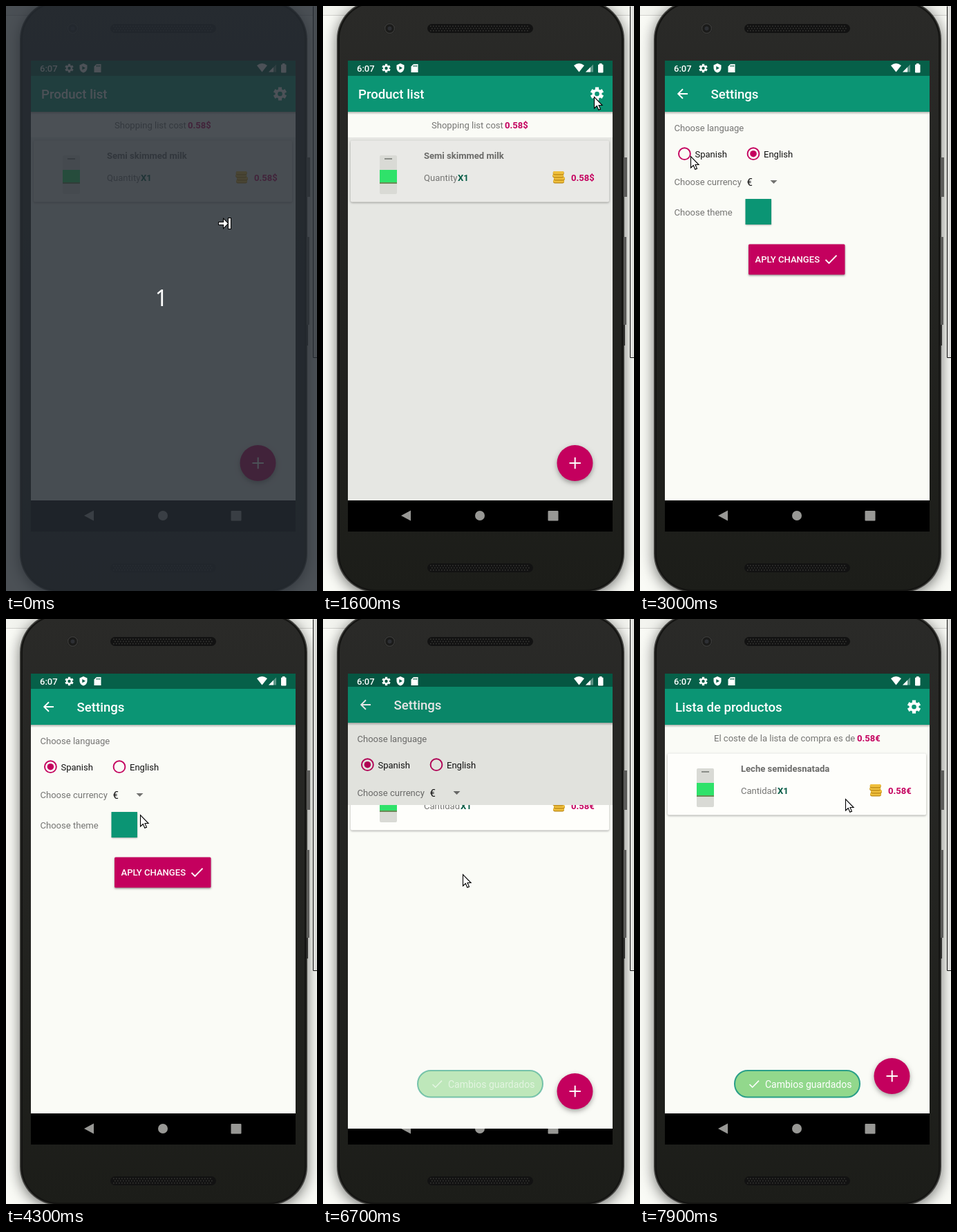
Animation of 450 by 846 pixels, one loop 8 s. Source, as an HTML page with a canvas:

```html
<!DOCTYPE html>
<html lang="en">
<head>
<meta charset="utf-8">
<title>Shopping list settings</title>
<style>
  html, body { margin: 0; width: 100%; height: 100%; overflow: hidden; }
  canvas { display: block; }
</style>
</head>
<body>
<canvas id="stage" width="450" height="846"></canvas>
<script>
const ctx = document.getElementById('stage').getContext('2d');
const LOOP = 8000, STEP = 100;
const PINK = '#c4005e', TEAL = '#0b9574', DEEP = '#066049', GREY = '#757573', PAPER = '#fafbf6';
const SCREEN = { x: 36, y: 79, w: 383, h: 681, content: 636 };
const OPEN_SETTINGS = 1766, OPEN_LIST = 6600, SLIDE = 425;

// Pointer stops: arrival time and place. Each move takes at most MOVE ms.
const MOVE = 700;
const stop = (at, x, y) => ({ at, x, y });
const STOPS = [
  stop(200, 329, 307), stop(1000, 392, 131), stop(2400, 194, 250), stop(3000, 73, 217),
  stop(4200, 194, 295), stop(4500, 194, 259), stop(4800, 156, 245), stop(5400, 173, 266),
  stop(5800, 204, 356), stop(6000, 202, 369), stop(7900, 297, 260)
];

const clamp = v => Math.max(0, Math.min(1, v));
const mix = (a, b, p) => a + (b - a) * p;
const bez = (a, b, c, d, u) => {
  const v = 1 - u;
  return v * v * v * a + 3 * v * v * u * b + 3 * v * u * u * c + u * u * u * d;
};

function curve(x, xs, ys) {
  let lo = 0, hi = 1;
  for (let i = 0; i < 24; i++) {
    const m = (lo + hi) / 2;
    if (bez(...xs, m) < x) lo = m; else hi = m;
  }
  return bez(...ys, lo);
}
const slideEase = p => curve(p, [0, .4, .2, 1], [0, 0, 1, 1]);
const revealEase = p => p < 1 / 6
  ? curve(p, [0, .05, .1333, 1 / 6], [0, 0, .06, .4])
  : curve(p, [1 / 6, .2083, .25, 1], [.4, .82, 1, 1]);

function rect(x, y, w, h, color) {
  ctx.fillStyle = color;
  ctx.fillRect(x, y, w, h);
}
function round(x, y, w, h, r, color) {
  ctx.fillStyle = color;
  ctx.beginPath();
  ctx.roundRect(x, y, w, h, r);
  ctx.fill();
}
function disc(x, y, r, color) {
  ctx.fillStyle = color;
  ctx.beginPath();
  ctx.arc(x, y, r, 0, 7);
  ctx.fill();
}
function ring(x, y, r, width, color) {
  ctx.strokeStyle = color;
  ctx.lineWidth = width;
  ctx.beginPath();
  ctx.arc(x, y, r, 0, 7);
  ctx.stroke();
}
function fillPath(d, x, y, color) {
  const path = new Path2D(d);
  ctx.save();
  ctx.translate(x, y);
  ctx.fillStyle = color;
  ctx.fill(path);
  ctx.restore();
  return path;
}
function strokePath(d, x, y, width, color) {
  ctx.save();
  ctx.translate(x, y);
  ctx.strokeStyle = color;
  ctx.lineWidth = width;
  ctx.stroke(new Path2D(d));
  ctx.restore();
}
function text(s, x, y, color = GREY, weight = 400, size = 13.05) {
  ctx.font = `${weight} ${size}px Roboto, sans-serif`;
  ctx.fillStyle = color;
  ctx.fillText(s, x, y);
}
function shadowed(blur, dy, alpha, draw) {
  ctx.save();
  ctx.shadowColor = `rgba(0,0,0,${alpha})`;
  ctx.shadowBlur = blur;
  ctx.shadowOffsetY = dy;
  draw();
  ctx.restore();
}
function gear(x, y, r) {
  ring(x, y, r * .54, r * .38, '#fff');
  for (let i = 0; i < 6; i++) {
    ctx.save();
    ctx.translate(x, y);
    ctx.rotate(i * Math.PI / 3);
    rect(-r * .27, -r, r * .54, r * .4, '#fff');
    ctx.restore();
  }
}
const check = (x, y, w, width) =>
  strokePath(`M0 0l${w * .31} ${w * .31}L${w} ${-w * .4}`, x, y, width, '#fff');

function speaker(y) {
  round(151, y, 153, 13, 6.5, '#121212');
  for (let row = 0; row < 3; row++)
    for (let i = 0; i < 36; i++)
      rect(155 + i * 4 + row % 2 * 2, y + 2.5 + row * 3.2, 1.6, 1.6, '#353533');
}

function drawPhone() {
  rect(0, 0, 450, 846, PAPER);
  rect(0, 0, 450, 13, '#f3f4ef');
  rect(0, 13, 450, 1, '#d3d3cf');
  shadowed(20, 4, .55, () => round(20, -8, 416, 856, 56, '#42423f'));
  rect(445, 0, 5, 508, '#dededb');
  strokePath('M0 0V508H6', 444.5, .5, 1, '#111');
  rect(435, 219, 5, 57, '#5c5c5a');
  rect(435, 334, 4, 127, '#5c5c5a');
  rect(434, 461, 3, 30, '#30302e');
  round(21.5, -6.5, 413, 853, 55, '#141412');
  const body = ctx.createLinearGradient(0, 0, 0, 846);
  body.addColorStop(0, '#2a2a28');
  body.addColorStop(1, '#1c1d19');
  round(24, -4, 408, 848, 52, body);
  speaker(26);
  speaker(806);
  disc(96.5, 32.5, 8, '#1b1b1a');
  ring(96.5, 32.5, 7, 1.5, '#393937');
  disc(96.5, 32.5, 3, '#2d2f33');
}

function drawNav() {
  rect(SCREEN.x, SCREEN.y, SCREEN.w, SCREEN.h, '#000');
  fillPath('M0 0l14-7.5v15z', 113, 737, '#989895');
  disc(227, 737, 7, '#989895');
  round(325.5, 730, 15, 14.5, 1, '#989895');
}

function drawStatus() {
  text('6:07', 49, 95, '#fff', 500, 13);
  gear(91.5, 90, 6.2);
  fillPath('M0-7l5.5 2.5V0Q5 5 0 6.5Q-5 5-5.5 0v-4.5z', 112, 90, '#fff');
  fillPath('M-1.7-2.7L3 0l-4.7 2.5z', 112, 89.8, DEEP);
  fillPath('M0 3.5L3.5 0H10v12H0z', 127.5, 84, '#fff');
  for (let i = 0; i < 3; i++) rect(131 + i * 2, 85.5, 1, 2.5, DEEP);
  fillPath('M0 0l-7.5-9.5q7.5-6 15 0z', 370.5, 95.5, '#fff');
  fillPath('M0 0L11-11V0z', 380, 95.5, 'rgba(255,255,255,.35)');
  fillPath('M0 0l7-7v7z', 380, 95.5, '#fff');
  rect(400, 83, 3.5, 2, '#fff');
  round(398, 84.5, 7.5, 12, 1, '#fff');
}

function drawBar(title, x) {
  const shade = ctx.createLinearGradient(0, 153, 0, 157);
  shade.addColorStop(0, 'rgba(0,0,0,.28)');
  shade.addColorStop(1, 'rgba(0,0,0,0)');
  rect(SCREEN.x, 153, SCREEN.w, 4, shade);
  rect(SCREEN.x, 79, SCREEN.w, 22, DEEP);
  rect(SCREEN.x, 101, SCREEN.w, 52, TEAL);
  text(title, x, 134, '#fff', 500, 18.64);
}

function drawCarton() {
  round(82, 216, 25, 56, 2, '#d9dad5');
  rect(89, 220, 11, 2, '#8a8d88');
  rect(82, 237, 25, 18, '#2fe26a');
  rect(82, 255, 25, 2, '#6b8a56');
}

function drawCoins() {
  for (let i = 0; i < 4; i++) {
    const x = 333 + Math.sin(i * 2), y = 251 - i * 4;
    round(x, y, 16, 5.4, 2.7, '#b98512');
    round(x, y, 16, 4.2, 2.1, '#efbf3c');
  }
}

function drawList(words, background, card) {
  rect(SCREEN.x, SCREEN.y, SCREEN.w, SCREEN.content, background);
  rect(SCREEN.x, 153, SCREEN.w, 37, PAPER);
  drawBar(words.title, 51);
  gear(396.5, 127, 9.6);
  text(words.cost, words.costX, 177);
  text(words.sum, words.sumX, 177, PINK, 700);
  shadowed(3, 1, .35, () => round(40, 194.5, 374, 89, 2, card));
  drawCarton();
  text(words.item, 146, 220.5, '#6a6a68', 700);
  text(words.amount, 146, 252.5);
  text('X1', words.countX, 252.5, '#055c46', 700);
  drawCoins();
  text(words.sum, 359, 252.5, PINK, 700);
  shadowed(7, 3, .35, () => disc(364.5, 661, 26, PINK));
  strokePath('M-8.2 0H8.2M0-8.2V8.2', 364.7, 661, 2, '#fff');
}

const ENGLISH = {
  title: 'Product list', cost: 'Shopping list cost', costX: 157, sum: '0.58$', sumX: 263,
  item: 'Semi skimmed milk', amount: 'Quantity', countX: 195
};
const SPANISH = {
  title: 'Lista de productos', cost: 'El coste de la lista de compra es de', costX: 107,
  sum: '0.58€', sumX: 314, item: 'Leche semidesnatada', amount: 'Cantidad', countX: 199
};

function drawRadio(x, label, on) {
  ring(x, 213.7, 8.4, 1.9, PINK);
  if (on > 0) disc(x, 213.7, 4.8 * on, PINK);
  text(label, x + 15, 218.5, '#111');
}

function drawSettings(t) {
  rect(SCREEN.x, SCREEN.y, SCREEN.w, SCREEN.content, PAPER);
  drawBar('Settings', 102.5);
  strokePath('M14 0H1M7-6.7L.2 0L7 6.7', 55, 127, 1.9, '#fff');
  text('Choose language', 49.5, 181.3);
  const picked = clamp((t - 3350) / 150);
  if (t >= 3300 && t < 3700)
    disc(64.5, 213.7, 18.3 * clamp((t - 3200) / 200), `rgba(196,0,94,${.16 * clamp((3800 - t) / 300)})`);
  drawRadio(64.4, 'Spanish', picked);
  drawRadio(164, 'English', 1 - picked);
  text('Choose currency', 49.5, 259.3);
  text('€', 154.5, 259.5, '#111', 400, 14.9);
  fillPath('M-5 0H5L0 5z', 193.5, 252, '#727270');
  text('Choose theme', 49.5, 302.5);
  shadowed(2, 1, .3, () => rect(152.5, 279, 37.5, 37, TEAL));
  const pressed = t >= 6300 && t < 6400;
  shadowed(3, 1.5, .4, () => round(157, 344.5, 139.5, 44, 1.5, pressed ? '#cd2676' : PINK));
  text('APLY CHANGES', 166.5, 371.3, '#fff', 500);
  check(268.5, 367, 16, 1.9);
}

// The new page slides up and unrolls from below while the old one lifts and dims.
function slideOver(age, oldPage, newPage) {
  const p = clamp(age / SLIDE), move = slideEase(p);
  const place = (dy, top, page) => {
    ctx.save();
    ctx.beginPath();
    ctx.rect(SCREEN.x, top, SCREEN.w, SCREEN.y + SCREEN.h - top);
    ctx.clip();
    ctx.translate(0, Math.round(dy));
    page();
    ctx.restore();
  };
  if (p < 1) place(-.02 * SCREEN.h * move, SCREEN.y, () => {
    oldPage();
    rect(SCREEN.x, SCREEN.y, SCREEN.w, SCREEN.content, `rgba(0,0,0,${.1 * clamp(age / 83)})`);
  });
  if (p > 0) {
    const dy = .041 * SCREEN.h * (1 - move);
    const top = SCREEN.y + dy + .959 * SCREEN.h * (1 - revealEase(p));
    place(dy, Math.round(top), newPage);
  }
}

function drawToast(t) {
  const left = 1 - clamp((t - 6530) / 500);
  ctx.save();
  ctx.globalAlpha = 1 - left * left;
  round(137, 653, 181, 38.5, 19, '#92d88c');
  ctx.strokeStyle = '#2a9f88';
  ctx.lineWidth = 2;
  ctx.stroke();
  check(158.5, 673, 13.5, 1.6);
  text('Cambios guardados', 181, 678, '#fff', 400, 14);
  ctx.restore();
}

function drawPointer(t) {
  const next = STOPS.findIndex(s => s.at > t);
  const b = STOPS.at(next), a = next > 0 ? STOPS[next - 1] : b;
  const span = Math.min(MOVE, b.at - a.at) || 1;
  const p = clamp(1 - (b.at - t) / span);
  const x = Math.round(mix(a.x, b.x, p)) + .5, y = Math.round(mix(a.y, b.y, p)) + .5;
  const arrow = 'M0 0V16.5L3.8 13L6.3 18.8L9 17.6L6.5 12H11.6z';
  fillPath(arrow, x, y, '#fff');
  strokePath(arrow, x, y, 1.1, '#000');
}

function drawCountdown() {
  rect(0, 0, 450, 846, 'rgba(37,43,50,.82)');
  ctx.font = '32px "Noto Sans", sans-serif';
  ctx.fillStyle = '#fff';
  ctx.textAlign = 'center';
  ctx.fillText('1', 225, 434);
  ctx.textAlign = 'left';
  const arrow = 'M0-1.5H7V-6L13 0L7 6V1.5H0zM14-7.5h3v15h-3z';
  strokePath(arrow, 308, 314.5, 2, '#000');
  fillPath(arrow, 308, 314.5, '#fff');
}

function draw(t) {
  drawPhone();
  drawNav();
  const settings = () => drawSettings(t);
  if (t < OPEN_LIST)
    slideOver(t - OPEN_SETTINGS, () => drawList(ENGLISH, '#e6e7e3', '#e9e9e6'), settings);
  else
    slideOver(t - OPEN_LIST, settings, () => drawList(SPANISH, PAPER, '#fefefb'));
  drawStatus();
  if (t > 6530) drawToast(t);
  if (t < 100) drawCountdown();
  else drawPointer(t);
}

function tick() {
  draw(Math.floor(performance.now() % LOOP / STEP) * STEP);
  requestAnimationFrame(tick);
}
tick();
</script>
</body>
</html>
```
